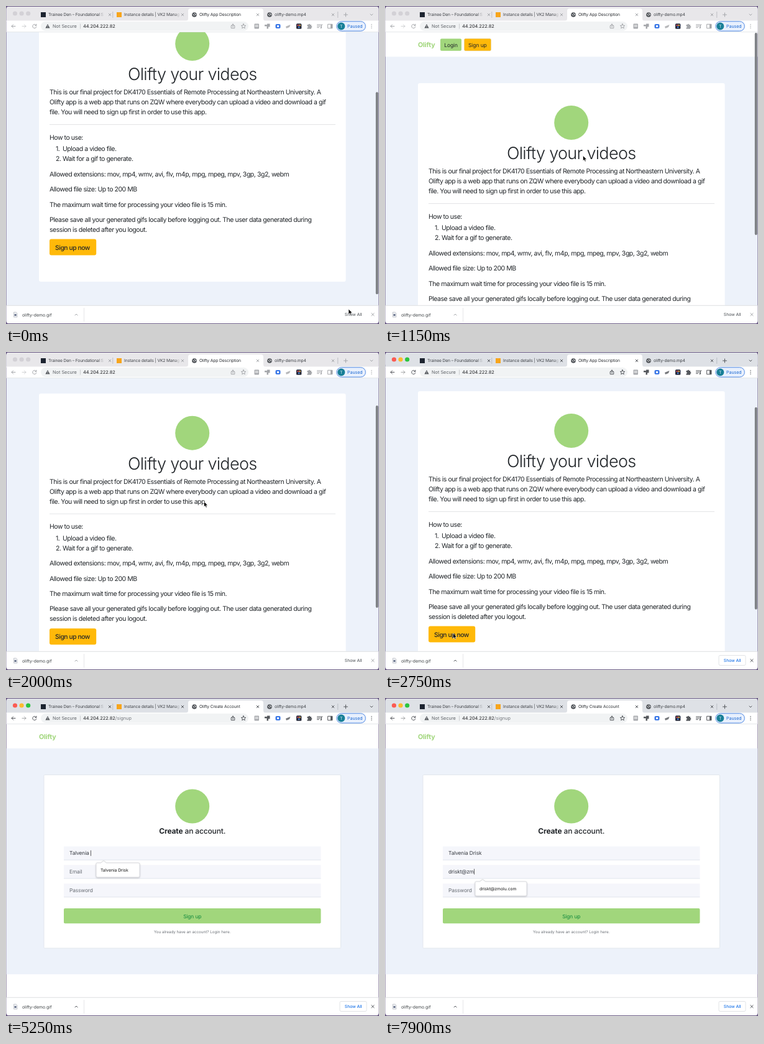
An HTML page that plays this animation: 600x511 px, repeating every 8 s.

```html
<!DOCTYPE html>
<html lang="en">
<head>
<meta charset="utf-8">
<title>Olifty demo</title>
<style>
  html, body { margin: 0; width: 100%; height: 100%; overflow: hidden; background: #6b5b85; }
  svg { display: block; width: 600px; height: 511px; font-family: Inter, "Open Sans", sans-serif;
        clip-path: inset(1px .6px 1px .6px round 4px);
        text-rendering: geometricPrecision; --strip: #e8e7ea; --icon: #a5a7ab; --link: #5f6368; --edge: none; }
  svg.active { --strip: #dee1e6; --icon: #55585d; --link: #1a73e8; --edge: #dadce0; }
  text { white-space: pre; }
  .icon { fill: none; stroke: var(--icon); stroke-width: 1; stroke-linecap: round; stroke-linejoin: round; }
  .solid { fill: var(--icon); }
  .strip { fill: var(--strip); }
  .light { fill: #d3d1d6; }
  .active .red { fill: #fb5b53; }
  .active .yellow { fill: #fcbb2f; }
  .active .green { fill: #2bc53f; }
</style>
</head>
<body>
<svg id="stage" viewBox="0 0 600 511"></svg>
<script>
const GREEN = '#a1d67c', AMBER = '#ffb909', INK = '#212529', BLUE = '#edf2fa';
const stage = document.getElementById('stage');

const rect = (x, y, w, h, fill, extra = '') =>
  `<rect x="${x}" y="${y}" width="${w}" height="${h}" fill="${fill}" ${extra}/>`;
const circle = (x, y, r, fill, extra = '') =>
  `<circle cx="${x}" cy="${y}" r="${r}" fill="${fill}" ${extra}/>`;
const icon = (d, extra = '') => `<path class="icon" d="${d}" ${extra}/>`;
const text = (x, y, value, size, fill = INK, extra = '') =>
  `<text x="${x}" y="${y}" font-size="${size}" fill="${fill}" ${extra}>${value}</text>`;
const body = (x, middle, value) => text(x, middle + 3.8, value, 10.5, INK, 'letter-spacing="-.46"');
const cross = (x, y, r = 2) => icon(`M${x - r} ${y - r}l${2 * r} ${2 * r}m0 ${-2 * r}l${-2 * r} ${2 * r}`);
const centred = 'text-anchor="middle"';
const globe = (x, y) => circle(x, y, 3.8, '#4d5156') +
  `<path d="M${x - 2.4} ${y - 1.2}l1.6 1.3 .3 1.7M${x + .4} ${y - 2.6}l.4 1.5 1.6 .6-.8 1.6" fill="none" stroke="#fff" stroke-width=".9"/>`;
const brand = text(53, 66, 'Olifty', 10.7, GREEN, 'font-weight="700" letter-spacing="-.15"');

function homePage() {
  const lines = [
    [70, 265.5, 'This is our final project for DK4170 Essentials of Remote Processing at Northeastern University. A'],
    [70, 281.5, 'Olifty app is a web app that runs on ZQW where everybody can upload a video and download a gif'],
    [70, 297.5, 'file. You will need to sign up first in order to use this app.'],
    [70, 338, 'How to use:'],
    [80, 356.5, '1.'], [91, 356.5, 'Upload a video file.'],
    [80, 372.5, '2.'], [91, 372.5, 'Wait for a gif to generate.'],
    [70, 397, 'Allowed extensions: mov, mp4, wmv, avi, flv, m4p, mpg, mpeg, mpv, 3gp, 3g2, webm'],
    [70, 421.5, 'Allowed file size: Up to 200 MB'],
    [70, 446, 'The maximum wait time for processing your video file is 15 min.'],
    [70, 470, 'Please save all your generated gifs locally before logging out. The user data generated during'],
    [70, 486, 'session is deleted after you logout.'],
  ];
  return rect(0, 0, 600, 700, BLUE) + rect(0, 0, 600, 81.5, '#fff') + brand +
    rect(89, 52.5, 34, 19.5, GREEN, 'rx="2"') + text(95.3, 65.5, 'Login', 8.5, INK, 'letter-spacing="-.1"') +
    rect(127.5, 52.5, 43, 19.5, AMBER, 'rx="2" stroke="#d9c48a" stroke-width=".5"') +
    text(134, 65.5, 'Sign up', 8.5, INK, 'letter-spacing="-.1"') +
    rect(53, 124, 493.6, 446, '#fff', 'rx="3"') + circle(299.7, 187.5, 27.5, GREEN) +
    text(299.7, 246, 'Olifty your videos', 27, INK, `${centred} font-weight="350" letter-spacing="-.68"`) +
    rect(70, 317, 460, .8, '#dcdee0') + rect(70, 501.5, 75.2, 26, AMBER, 'rx="3"') +
    text(79, 518.7, 'Sign up now', 10.3, INK, 'font-weight="500" letter-spacing="-.43"') +
    lines.map(line => body(...line)).join('');
}

function signupPage() {
  const field = y => rect(93, y, 413.5, 22, '#f5f6fb') + rect(93, y + 21.3, 413.5, .8, '#dde1e9');
  const label = (id, y) => text(102, y, '', 8.4, '#50555b', `id="${id}" letter-spacing="-.13"`);
  const popup = (id, y, width, value) => `<g id="${id}">` +
    `<path d="M146.500 ${y}h6l4.500-3.500 4.500 3.500H${143 + width}q2 0 2 2v19q0 2-2 2H147q-2 0-2-2v-19q0-2 1.500-2z" fill="#fff" stroke="#c9cbd0" stroke-width=".7" filter="url(#shadow)"/>` +
    text(152, y + 14, value, 6.75, '#111') + '</g>';
  return rect(0, 0, 600, 511, '#fff') + brand + rect(0, 81, 600, 363, BLUE) +
    rect(61, 123.5, 477.5, 278.5, '#fff', 'rx="1.5" stroke="#dde2e9" stroke-width=".8"') +
    circle(299.7, 174, 27.5, GREEN) +
    text(299.7, 218, '<tspan font-weight="700">Create</tspan> an account.', 12, INK, `${centred} font-weight="500" letter-spacing="-.15"`) +
    [238.5, 268.3, 298.2].map(field).join('') +
    label('name', 252.2) + label('email', 282) +
    text(102, 311.8, 'Password', 8.4, '#666b72', 'letter-spacing="-.13"') +
    rect(0, 0, .7, 9, '#222', 'id="caret"') +
    rect(93, 338, 413.5, 24.3, GREEN, 'rx="2"') +
    text(299.7, 353.5, 'Sign up', 8.4, '#128a3e', `${centred} letter-spacing="-.13"`) +
    text(299.7, 378, 'You already have an account? Login here.', 6.26, '#6c7177', centred) +
    popup('namePopup', 265, 70, 'Talvenia Drisk') + popup('emailPopup', 295, 83, 'driskt@zmolu.com');
}

function browserChrome() {
  const tabText = (x, value, fill = '#3f4247', extra = '') => text(x, 16.3, value, 6.75, fill, `letter-spacing="-.14" ${extra}`);
  const fade = (id, x) => `<linearGradient id="${id}" gradientUnits="userSpaceOnUse" x1="${x - 9}" x2="${x}">` +
    '<stop stop-color="#3f4247"/><stop offset="1" stop-color="#3f4247" stop-opacity="0"/></linearGradient>';
  const lights = ['red', 'yellow', 'green'].map((c, i) => `<circle class="light ${c}" cx="${14.5 + 10.6 * i}" cy="12" r="3.6"/>`).join('');
  return `<defs>${fade('fadeA', 158)}${fade('fadeB', 280)}
    <filter id="shadow" x="-20%" y="-30%" width="140%" height="180%"><feDropShadow dx="0" dy=".8" stdDeviation="1" flood-opacity=".25"/></filter></defs>` +
    '<rect class="strip" width="600" height="25"/>' + lights +
    '<path d="M289 24q4 0 4-4V8q0-4 4-4H410q4 0 4 4v12q0 4 4 4z" fill="#fff"/>' +
    rect(0, 23.5, 600, 18.5, '#fff') + rect(0, 41.4, 600, .8, '#dcdfe3') +
    rect(56, 10, 8, 8, '#1d2430') + rect(178, 10, 8, 8, '#f7a51c') + globe(303, 14) + globe(424, 14) +
    tabText(68, 'Trainee Den – Foundational S', 'url(#fadeA)') +
    tabText(190, 'Instance details | VK2 Manag', 'url(#fadeB)') +
    tabText(311, '', '#2d3034', 'id="tabTitle"') + tabText(432, 'olifty-demo.mp4') +
    [167, 284, 405, 526].map(x => cross(x, 14, 1.8)).join('') +
    rect(171.5, 9, .7, 10, '#a9adb3') + rect(533.5, 9, .7, 10, '#a9adb3') +
    icon('M543.500 14h6m-3-3v6M586 13l2 2 2-2') +
    // navigation and address field
    icon('M15 32.500H9m2.700-2.700L9 32.500l2.700 2.700') +
    icon('M26 32.500h6m-2.700-2.700L32 32.500l-2.700 2.700', 'opacity=".5"') +
    icon('M48.600 31a3.100 3.100 0 1 0 .3 2.400m0-4.200v2.200h-2.200') +
    rect(56, 25, 334, 15, '#f1f3f4', 'rx="7.5"') +
    '<path d="M67 29l3.600 6.400h-7.200z" fill="#505459"/>' + rect(66.6, 31, .8, 2.2, '#fff') + rect(66.6, 33.8, .8, .8, '#fff') +
    text(75, 35.2, 'Not Secure', 7.35, '#5f6368') + rect(119, 28.5, .7, 8, '#b9bcc0') +
    text(124, 35.2, '44.204.222.82<tspan id="path" fill="#777b80">/signup</tspan>', 7.4, '#202124') +
    icon('M363.500 31.500h-1.300v4.200h5.600v-4.200h-1.300M365 34v-5m-1.600 1.500L365 29l1.600 1.500') +
    icon('M382 28.700l1.100 2.500 2.600.2-2 1.800.6 2.600-2.300-1.400-2.300 1.400.6-2.600-2-1.800 2.600-.2z') +
    // extension buttons
    rect(399.5, 28.5, 7.5, 8, '#a7a9ad', 'rx="1"') + icon('M401 31h4.500m-4.500 2h4.500', 'style="stroke:#fff"') +
    '<path class="solid" d="M416 30h4v-1.500h4.500v5H422v3h-2.500v-4H416z"/>' +
    rect(433.5, 29, 8, 7, '#3b78e7', 'rx="2"') + rect(436, 31, 3, 3, '#fff') +
    '<path class="solid" d="M450 33l7.500-3-1.500 4-5 2z" opacity=".8"/>' +
    rect(467, 28.3, 8.4, 8.4, '#262b3c', 'rx="1.5"') + circle(469.7, 31, 1.2, '#e34f62') + circle(472.7, 31, 1.2, '#f0b840') + circle(471.2, 34, 1.2, '#4a8df0') +
    '<path class="solid" d="M484.500 30h2a1.300 1.300 0 1 1 2.600 0h2v2.200a1.300 1.300 0 1 1 0 2.600v2h-6.600v-2a1.300 1.300 0 1 0 0-2.600z"/>' +
    icon('M500.500 30h6m-6 2.300h6m-6 2.300h3m5.500-4.600h-1.500v5') + '<circle class="solid" cx="506.600" cy="35" r="1.100"/>' +
    icon('M518 29.300h7v6.500h-7z') + '<rect class="solid" x="522" y="29.300" width="3" height="6.500"/>' +
    rect(531.8, 24.8, 46.6, 15.4, '#e8f0fd', 'rx="7.7" stroke="#4f88e3"') +
    circle(539.3, 32.5, 6, '#187f97') + text(539.3, 34.8, 'T', 6.2, '#fff', centred) +
    text(549, 35.1, 'Paused', 7, '#1a67d2') +
    [29.8, 32.5, 35.2].map(y => `<circle class="solid" cx="588" cy="${y}" r=".75"/>`).join('') +
    // download shelf
    rect(0, 481, 600, 30, '#fff') + rect(0, 480.8, 600, .8, '#d5d7da') +
    '<path d="M12.500 492h3.800l1.700 1.700v6.300h-5.500z" fill="#eef0f3" stroke="#a9adb5" stroke-width=".6"/>' + rect(13.6, 495, 3, 3, '#667089') +
    text(26, 498.6, 'olifty-demo.gif', 6.85, '#3c4043') +
    icon('M111 497l2-2 2 2') + rect(125, 485, .7, 22, '#dadce0') +
    '<rect x="537" y="487.500" width="43" height="16" rx="2" fill="none" style="stroke:var(--edge)" stroke-width=".8"/>' +
    text(558.7, 498.2, 'Show All', 6.7, INK, `${centred} font-weight="500" style="fill:var(--link)"`) + cross(590, 495.7, 2.1);
}

stage.innerHTML = `<g id="home">${homePage()}</g><g id="signup">${signupPage()}</g>` +
  rect(594.8, 0, 4, 325, '#7d8084', 'id="thumb" rx="2"') + browserChrome() +
  '<path id="pointer" d="M0 0v8.300l1.900-1.700 1.300 3 1.500-.6-1.300-2.900h2.600z" fill="#000" stroke="#fff" stroke-width=".6"/>';

const part = Object.fromEntries([...stage.querySelectorAll('[id]')].map(el => [el.id, el]));
const show = (el, on) => { el.style.display = on ? '' : 'none'; };
const ease = (t, start, end) => {
  const p = Math.min(1, Math.max(0, (t - start) / (end - start)));
  return p * p * (3 - 2 * p);
};
const typed = (value, t, start, step) => value.slice(0, Math.max(0, Math.floor((t - start) / step) + 1));

const MOVES = [[50, 500, 318.5, 240.5], [2100, 2600, 109.5, 452], [3650, 4250, 180, 246]];
function pointerAt(t) {
  let x = 551, y = 487;
  for (const [start, end, toX, toY] of MOVES) {
    const p = ease(t, start, end);
    x += (toX - x) * p;
    y += (toY - y) * p;
  }
  return `translate(${x} ${y})`;
}

function setField(el, value, placeholder) {
  el.textContent = value || placeholder;
  el.setAttribute('fill', value ? '#363a40' : '#666b72');
}

function draw(t) {
  const onSignup = t >= 3500;
  const scroll = 127 * (1 - ease(t, 650, 1150)) + 61 * ease(t, 1550, 2080);
  stage.classList.toggle('active', t >= 2650);
  show(part.home, !onSignup);
  show(part.signup, onSignup);
  show(part.path, onSignup);
  show(part.thumb, !onSignup);
  part.home.setAttribute('transform', `translate(0 ${-scroll})`);
  part.thumb.setAttribute('y', 43 + scroll * .75);
  part.tabTitle.textContent = onSignup ? 'Olifty Create Account' : 'Olifty App Description';
  part.pointer.setAttribute('transform', pointerAt(t));
  show(part.pointer, t < 4500);
  if (!onSignup) return;

  const name = typed('Talvenia Drisk', t, 4500, 85);
  const email = typed('driskt@zm', t, 6500, 170);
  setField(part.name, name, 'Name');
  setField(part.email, email, 'Email');
  show(part.namePopup, name && t < 5800);
  show(part.emailPopup, email);

  const onEmail = t >= 6000;
  const value = onEmail ? email : name;
  const width = value ? (onEmail ? part.email : part.name).getComputedTextLength() : 0;
  show(part.caret, t >= 4300);
  part.caret.setAttribute('x', 102.3 + width);
  part.caret.setAttribute('y', onEmail ? 274.6 : 244.8);
}

function frame() {
  draw(performance.now() % 8000);
  requestAnimationFrame(frame);
}
frame();
</script>
</body>
</html>
```
